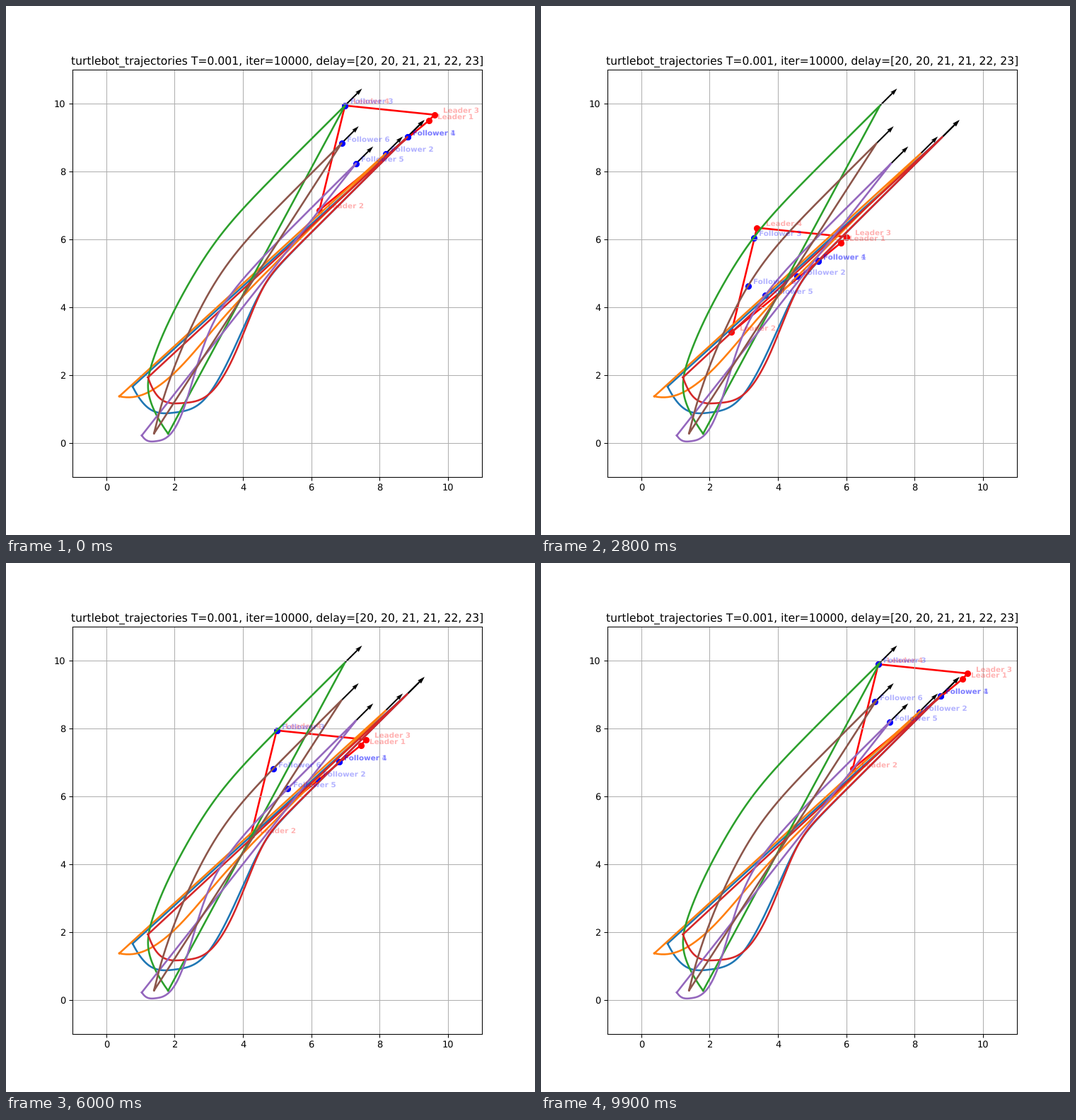
Recreate the animation shown at these times as a matplotlib script. Size 748 px wide and 748 px high, loop 10 s.

```python
import numpy as np
import matplotlib.pyplot as plt
from matplotlib.animation import FuncAnimation

plt.rcParams.update({"font.family": "DejaVu Sans", "text.hinting": "none"})

FRAMES, DURATION = 100, 10.0
VELOCITY = np.array([0.5, 0.5])

# Formation at t = 0; the leaders simply drift with VELOCITY.
L1, L2, L3, L4 = LEADERS = np.array([(4.446, 4.498), (1.238, 1.857),
                                     (4.605, 4.667), (1.987, 4.938)])
HULL = [0, 1, 3, 2, 0]

# Each follower settles on the mean of its neighbours.
G2, G6 = np.array([(3.18, 3.526), (1.887, 3.828)])
G1 = (L1 + G2) / 2
G5 = (G1 + G6 + L2) / 3
GOALS = [G1, G2, L4, G1, G5, G6]

# Key points on the way there, at these values of 1 - exp(-t).
KNOTS = np.array([0, 0.1, 0.25, 0.45, 0.65, 0.85, 1])
MEET = (4.641, 4.661)
KEYS = [
    [(0.77, 1.66), (1.24, 1.02), (1.98, 0.89), (2.87, 1.28), (3.75, 2.80), MEET],
    [(0.38, 1.37), (0.90, 1.37), (1.62, 1.74), (2.45, 2.54), (3.25, 3.48), (4.06, 4.38)],
    [(1.81, 0.27), (1.50, 0.76), (1.23, 1.53), (1.42, 2.59), (1.92, 3.76), (2.69, 5.16)],
    [(1.22, 1.93), (1.56, 1.32), (2.20, 1.17), (3.00, 1.43), (3.79, 2.68), MEET],
    [(1.04, 0.22), (1.19, 0.07), (1.46, 0.05), (1.84, 0.22), (2.32, 1.16), (3.04, 3.34)],
    [(1.40, 0.28), (1.40, 0.30), (1.43, 0.41), (1.54, 0.85), (1.81, 1.73), (2.47, 3.37)],
]


def spline(x, y, q):
    """Cubic spline: constant curvature at the start, straight at the end."""
    h, n = np.diff(x), len(x)
    a, b = np.eye(n), np.zeros_like(y)
    a[0, 1] = -1
    for i in range(1, n - 1):
        a[i, i - 1:i + 2] = h[i - 1], 2 * (h[i - 1] + h[i]), h[i]
        b[i] = 6 * ((y[i + 1] - y[i]) / h[i] - (y[i] - y[i - 1]) / h[i - 1])
    m = np.linalg.solve(a, b)
    k = np.clip(np.searchsorted(x, q) - 1, 0, n - 2)
    u, v, w = ((x[k + 1] - q)[:, None], (q - x[k])[:, None], h[k][:, None])
    return ((m[k] * u**3 + m[k + 1] * v**3) / (6 * w)
            + (y[k] / w - m[k] * w / 6) * u + (y[k + 1] / w - m[k + 1] * w / 6) * v)


def follow(keys, goal, t):
    """Drifting goal plus an error that ends as a plain exponential decay."""
    key_t = -np.log(1 - KNOTS[:-1])
    error = np.array(keys) - goal - np.outer(key_t, VELOCITY)
    error = np.vstack([error, (0, 0)])
    return goal + np.outer(t, VELOCITY) + spline(KNOTS, error, 1 - np.exp(-t))


time = np.linspace(0, DURATION, 1001)
paths = [follow(k, g, time) for k, g in zip(KEYS, GOALS)]
ends = np.array([p[-1] for p in paths])

fig, ax = plt.subplots(figsize=(8, 8), dpi=93.5)
ax.set(xlim=(-1, 11), ylim=(-1, 11))
ax.grid(True)
ax.set_title("turtlebot_trajectories T=0.001, iter=10000, "
             "delay=[20, 20, 21, 21, 22, 23]")

for path in paths:
    ax.plot(*np.vstack([path, path[:1]]).T, lw=2)
ax.quiver(*ends.T, *np.tile(VELOCITY[:, None], len(ends)), angles="xy",
          scale_units="xy", scale=1, width=0.0035)

hull, = ax.plot([], [], color="red", lw=2, zorder=1)


def team(name, count, color):
    dots = ax.scatter([0] * count, [0] * count, color=color, zorder=1)
    texts = [ax.text(0, 0, f"{name} {i + 1}", color=color, alpha=0.3,
                     size=8, weight="bold") for i in range(count)]
    return dots, texts


def place(group, points, dx):
    dots, texts = group
    dots.set_offsets(points)
    for text, (x, y) in zip(texts, points):
        text.set_position((x + dx, y + 0.05))


leaders = team("Leader", len(LEADERS), "red")
followers = team("Follower", len(GOALS), "blue")


def draw(i):
    # The loop opens on the final pose.
    k = (i or FRAMES) * 10
    lead = LEADERS + VELOCITY * time[k]
    hull.set_data(*lead[HULL].T)
    place(leaders, lead, 0.25)
    place(followers, [p[k] for p in paths], 0.15)
    return [hull, leaders[0], followers[0], *leaders[1], *followers[1]]


anim = FuncAnimation(fig, draw, frames=FRAMES, interval=100,
                     repeat=True, repeat_delay=0)
plt.show()
```
